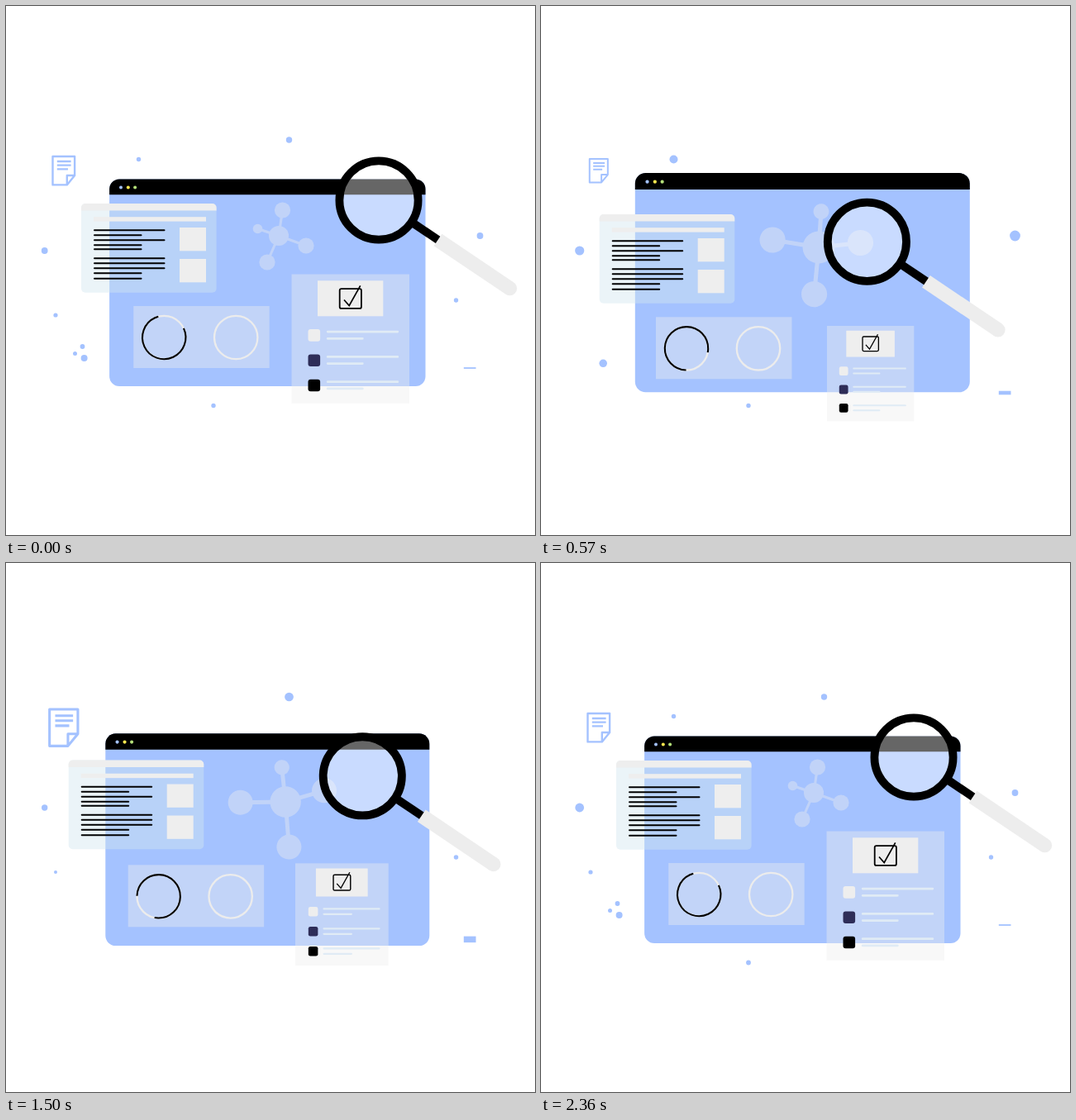
Write an HTML page that moves like this. It is 640x640 px and loops after 2430 ms.

```html
<!DOCTYPE html>
<html lang="en">
<head>
<meta charset="utf-8">
<title>Search dashboard</title>
<style>
  html, body { margin: 0; width: 100%; height: 100%; overflow: hidden; background: #fff; }
  svg { display: block; width: 100%; height: 100%; }
  .blue { fill: #a4c2ff; }
  .pale { fill: #eee; }
  .glass { fill: #eee; opacity: .4; }
  .line { fill: none; stroke: #000; stroke-width: 2; stroke-linecap: round; }
  .soft { fill: none; stroke: #e0ebf5; stroke-width: 2.8; stroke-linecap: round; }
  .ring { fill: none; stroke: #ececec; stroke-width: 2.3; }
  .doc { fill: none; stroke: #a4c2ff; stroke-width: 2.4; stroke-linejoin: round; }
</style>
</head>
<body>
<svg viewBox="0 0 640 640">
  <g id="dots"></g>
  <rect id="dash" class="blue" x="553.8" width="14.7"/>
  <g id="doc" class="doc">
    <path d="M-13.3-17.2H13.3V5.8L4 17.2H-13.3ZM13.3 5.8H4V17.2"/>
    <path d="M-8-11.2H8.8M-8-6.6H8.8M-8-1.8H5.2"/>
  </g>

  <g id="win">
    <rect class="blue" x="-191.2" y="-125.2" width="382.4" height="250.4" rx="12"/>
    <path d="M-191.2-106.4V-113.2A12 12 0 0 1-179.2-125.2H179.2A12 12 0 0 1 191.2-113.2V-106.4Z"/>
    <circle class="blue" cx="-177.3" cy="-115.2" r="2"/>
    <circle cx="-168.5" cy="-115.2" r="2" fill="#ffe94f"/>
    <circle cx="-160.2" cy="-115.2" r="2" fill="#b4e07a"/>
  </g>

  <g id="charts">
    <rect class="glass" width="164.5" height="75"/>
    <circle class="ring" cx="37" cy="38" r="26.2"/>
    <circle class="ring" cx="124" cy="38" r="26.2"/>
    <circle id="arc" r="26.2" fill="none" stroke="#000" stroke-width="2.1" pathLength="360" stroke-dasharray="280 80"/>
  </g>

  <g id="article">
    <rect width="163.6" height="107.7" rx="5" fill="#d1e6ee" opacity=".44"/>
    <path class="pale" d="M0 8.4V5A5 5 0 0 1 5 0H158.6A5 5 0 0 1 163.6 5V8.4Z"/>
    <rect class="pale" x="15" y="16.2" width="136" height="5.4"/>
    <rect class="pale" x="119" y="29" width="32" height="28.3"/>
    <rect class="pale" x="119" y="67" width="32" height="28.3"/>
    <path id="text" class="line"/>
  </g>

  <g id="mol" opacity=".4" fill="#eee" stroke="none">
    <path d="M0 0L4.5-31M0 0L33 12M0 0L-14 32M0 0L-25.5-8.5" stroke="#eee" stroke-width="3.1"/>
    <circle r="12"/>
    <circle cx="4.5" cy="-31" r="9.6"/>
    <circle cx="33" cy="12" r="9.6"/>
    <circle cx="-14" cy="32" r="9.6"/>
    <circle cx="-25.5" cy="-8.5" r="5.8"/>
  </g>

  <g id="list">
    <rect class="glass" width="142.5" height="156.3"/>
    <rect class="pale" x="31.5" y="7.8" width="79.3" height="43"/>
    <rect x="58.2" y="17.6" width="26.2" height="23.8" rx="2" fill="none" stroke="#000" stroke-width="1.8"/>
    <path d="M63.5 31L69.7 38L83.2 13.8" fill="none" stroke="#000" stroke-width="1.7"/>
    <g id="rows"></g>
  </g>

  <g id="lens">
    <circle r="44" fill="#fff" opacity=".4"/>
    <path d="M39 26L73 48.8" stroke="#000" stroke-width="10"/>
    <path d="M71.5 48L158.5 106.6" stroke="#ededed" stroke-width="17.4"/>
    <circle cx="158.5" cy="106.6" r="8.7" fill="#ededed"/>
    <circle r="47.6" fill="none" stroke="#000" stroke-width="9.8"/>
  </g>
</svg>
<script>
const LOOP = 2430, FPS = 14;
const $ = id => document.getElementById(id);

function add(parent, tag, attrs) {
  const el = document.createElementNS('http://www.w3.org/2000/svg', tag);
  for (const k in attrs) el.setAttribute(k, attrs[k]);
  return parent.appendChild(el);
}

// Monotone cubic through [time, value] keys, at rest at the end.
function curve(keys) {
  const d = keys.slice(1).map((k, i) => (k[1] - keys[i][1]) / (k[0] - keys[i][0]));
  const m = keys.map((k, i) => {
    if (i === 0) return d[0];
    if (i === d.length) return 0;
    const a = d[i - 1], b = d[i];
    return a * b <= 0 ? 0 : 2 * a * b / (a + b);
  });
  return t => {
    const last = keys.length - 1;
    if (t >= keys[last][0]) return keys[last][1];
    let i = 0;
    while (t >= keys[i + 1][0]) i++;
    const h = keys[i + 1][0] - keys[i][0], u = (t - keys[i][0]) / h, v = 1 - u;
    return v * v * (1 + 2 * u) * keys[i][1] + u * u * (3 - 2 * u) * keys[i + 1][1]
      + h * u * v * (v * m[i] - u * m[i + 1]);
  };
}

// Out-and-back motion through six poses, optionally with a turning point.
const POSES = [0, 290, 570, 930, 1210, 1710, 2360];
function track(values, peak) {
  const keys = POSES.map((t, i) => [t, values[i % 6]]);
  if (peak) keys.splice(3, 0, peak);
  return curve(keys);
}

// Straight lines through a flat list: time, value, time, value...
function ramp(k) {
  return t => {
    if (t <= k[0]) return k[1];
    for (let i = 2; i < k.length; i += 2) {
      if (t <= k[i]) return k[i - 1] + (k[i + 1] - k[i - 1]) * (t - k[i - 2]) / (k[i] - k[i - 2]);
    }
    return k[k.length - 1];
  };
}

const winScale = track([1, 1.038, 1.059, 1.05, 1.038, 1.017], [690, 1.061]);
const articleX = track([91, 81, 70.7, 68.7, 71.7, 79], [790, 67.8]);
const articleY = track([239, 247.8, 252, 243.7, 241.3, 237.5]);
const chartsX = track([154.2, 144, 139, 140.5, 143.5, 150.2], [690, 138.5]);
const chartsY = track([363, 367.8, 376.3, 372.2, 368, 364.2]);
const arcTurn = track([0, 276, 476, 497, 360, 121], [750, 515]);
const molX = track([330, 329.5, 336, 340, 340, 336]);
const molY = track([278, 286, 292, 293, 293, 285]);
const molTurn = track([0, 44, 75.5, 80.6, 80.6, 48.4]);
const molScale = track([1, 1.365, 1.62, 1.68, 1.68, 1.42]);
const listX = track([345.5, 351, 346, 347.2, 350, 350]);
const listY = track([324.5, 363, 387, 384.4, 378, 351.6], [700, 389.5]);
const listScale = track([1, .79, .739, .739, .739, .849]);
const lensX = track([451, 407.5, 394.4, 393.6, 394.5, 453.4]);
const lensY = track([235, 256, 285.2, 290, 289.4, 237.8]);
const docScale = track([1, .93, .83, .82, 1.12, 1.34], [750, .79]);
const dashY = track([438, 456.3, 468, 470, 464.4, 449.3]);
const dashH = track([1.8, 2.6, 4.6, 7, 7.5, 7.5]);

// Text lines of the article card
$('text').setAttribute('d', [0, 1].map(block =>
  [32.3, 38.3, 44.2, 50.2, 55.3].map((y, i) => {
    const long = block ? i < 3 : i % 2 === 0 && i < 4;
    const shift = block ? (i === 4 ? 35.4 : 34) : 0;
    return `M16 ${y + shift}h${long ? 84.5 : 56.5}`;
  }).join('')).join(''));

// Rows of the checklist
['#eee', '#2e2d58', '#000'].forEach((fill, i) => {
  const y = 66.6 + i * 30.3;
  add($('rows'), 'rect', { x: 20, y, width: 14.6, height: 14.6, rx: 3, fill });
  add($('rows'), 'path', { class: 'soft', d: `M43.7 ${y + 3}H128.3M43.7 ${y + 11.2}H85.8` });
});

// Each dot: x, y, radius over time, opacity over time
const solid = [0, 1];
const trioOut = [0, 1, 70, 1, 220, 0, 1950, 0, 2150, 1];
const dots = [
  [342.5, 162, [0, 3.7, 360, 3.7, 430, 7.2, 780, 7.2, 930, 6.8, 1210, 6, 1710, 4.9, 2360, 3.7],
    [0, 1, 210, 1, 290, .5, 360, 0, 570, 0, 710, 1]],
  [160.5, 185.5, [0, 2.7, 290, 3.9, 570, 5, 640, 5.2, 800, 0, 1750, 0, 2360, 2.7], solid],
  [573.5, 278, [0, 3.9, 290, 5.2, 570, 6.4, 700, 7, 930, 3.9, 1140, 0, 1750, 0, 2360, 3.9], solid],
  [46.7, 296, [0, 3.9, 290, 4.8, 570, 5.6, 930, 6.7, 1210, 7.4, 1400, 7.4, 1600, 0,
    1900, 0, 2220, 7.4, 2290, 7, 2360, 5.4], solid],
  [60, 374, [0, 2.6, 290, 5.1, 360, 5.1, 500, 0, 1400, 0, 1650, 5, 1710, 4.8, 2360, 2.6], solid],
  [251, 483.5, [0, 2.7, 290, 4.1, 570, 2.7, 800, 0, 1780, 0, 2140, 4.6, 2290, 3.5, 2360, 2.9], solid],
  [544.5, 356, [0, 2.7, 220, 0, 1350, 0, 1600, 4.6, 1710, 4.2, 2360, 2.7], solid],
  [83.5, 420.5, [0, 2.5], trioOut],
  [92.5, 412, [0, 2.9], trioOut],
  [94.6, 426, [0, 4], trioOut],
  [75.2, 432.3, [0, 4.8], [430, 0, 560, 1, 1000, 1, 1140, 0]],
  [62, 425.5, [0, 3], [710, 0, 850, 1, 1290, 1, 1430, 0]],
  [72.6, 415.5, [0, 3.6], [1000, 0, 1140, 1, 1360, 1, 1500, 0]]
].map(([cx, cy, r, a]) => ({
  el: add($('dots'), 'circle', { class: 'blue', cx, cy }), r: ramp(r), a: ramp(a)
}));

const place = (id, transform) => $(id).setAttribute('transform', transform);

function draw(t) {
  place('win', `translate(316.3 334.7) scale(${winScale(t)})`);
  place('article', `translate(${articleX(t)} ${articleY(t)})`);
  place('charts', `translate(${chartsX(t)} ${chartsY(t)})`);
  place('arc', `translate(37 38) rotate(${arcTurn(t) - 25})`);
  place('mol', `translate(${molX(t)} ${molY(t)}) rotate(${molTurn(t)}) scale(${molScale(t)})`);
  place('list', `translate(${listX(t)} ${listY(t)}) scale(${listScale(t)})`);
  place('lens', `translate(${lensX(t)} ${lensY(t)})`);
  place('doc', `translate(69.8 199.2) scale(${docScale(t)})`);
  const h = dashH(t);
  $('dash').setAttribute('y', dashY(t) - h / 2);
  $('dash').setAttribute('height', h);
  for (const { el, r, a } of dots) {
    el.setAttribute('r', r(t));
    el.setAttribute('opacity', a(t));
  }
}

// Poses are held at 14 per second, on a 10 ms clock.
const start = performance.now();
function tick() {
  const clock = Math.floor((performance.now() - start) % LOOP / 10) * 10;
  const step = Math.floor((clock + 5) * FPS / 1000);
  draw(Math.round(step * 100 / FPS) * 10);
  requestAnimationFrame(tick);
}
tick();
</script>
</body>
</html>
```
